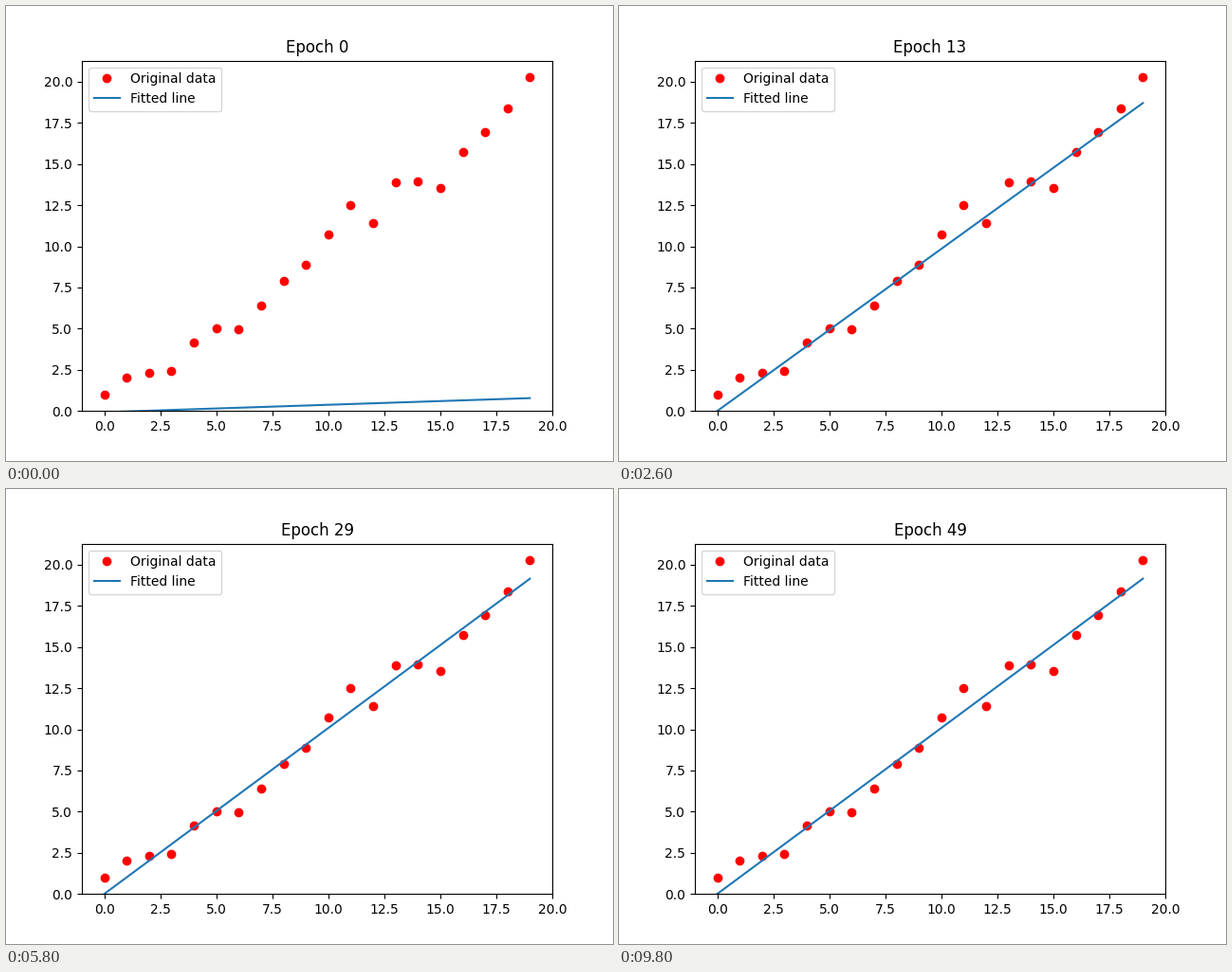
A matplotlib script that plays this animation: 640x480 px, repeating every 10000 ms.

```python
import numpy as np
import matplotlib.pyplot as plt
from matplotlib.animation import FuncAnimation

EPOCHS = 50
RATE = 0.001

x = np.arange(20)
y = np.array([0.99, 2.03, 2.32, 2.43, 4.16, 5.02, 4.94, 6.41, 7.93, 8.88,
              10.73, 12.51, 11.39, 13.89, 13.95, 13.55, 15.74, 16.95,
              18.39, 20.29])


def descend(w, b):
    """Gradient descent on the squared error; one (w, b) per epoch."""
    steps = []
    for _ in range(EPOCHS):
        steps.append((w, b))
        err = w * x + b - y
        w -= 2 * RATE * np.mean(err * x)
        b -= 2 * RATE * np.mean(err)
    return steps


steps = descend(0.045, -0.075)

plt.rcParams["font.family"] = "DejaVu Sans"
fig, ax = plt.subplots(figsize=(6.4, 4.8), dpi=100)
ax.plot(x, y, "ro", label="Original data")
line, = ax.plot(x, 0 * x, color="tab:blue", label="Fitted line")
ax.set_xlim(-1, 20)
ax.set_ylim(0, y.max() + 1)
ax.legend(loc="upper left")
title = ax.set_title("Epoch 0")


def draw(epoch):
    w, b = steps[epoch]
    line.set_ydata(w * x + b)
    title.set_text(f"Epoch {epoch}")
    return line, title


anim = FuncAnimation(fig, draw, frames=EPOCHS, interval=200,
                     repeat=True, repeat_delay=0, blit=False)
plt.show()
```
